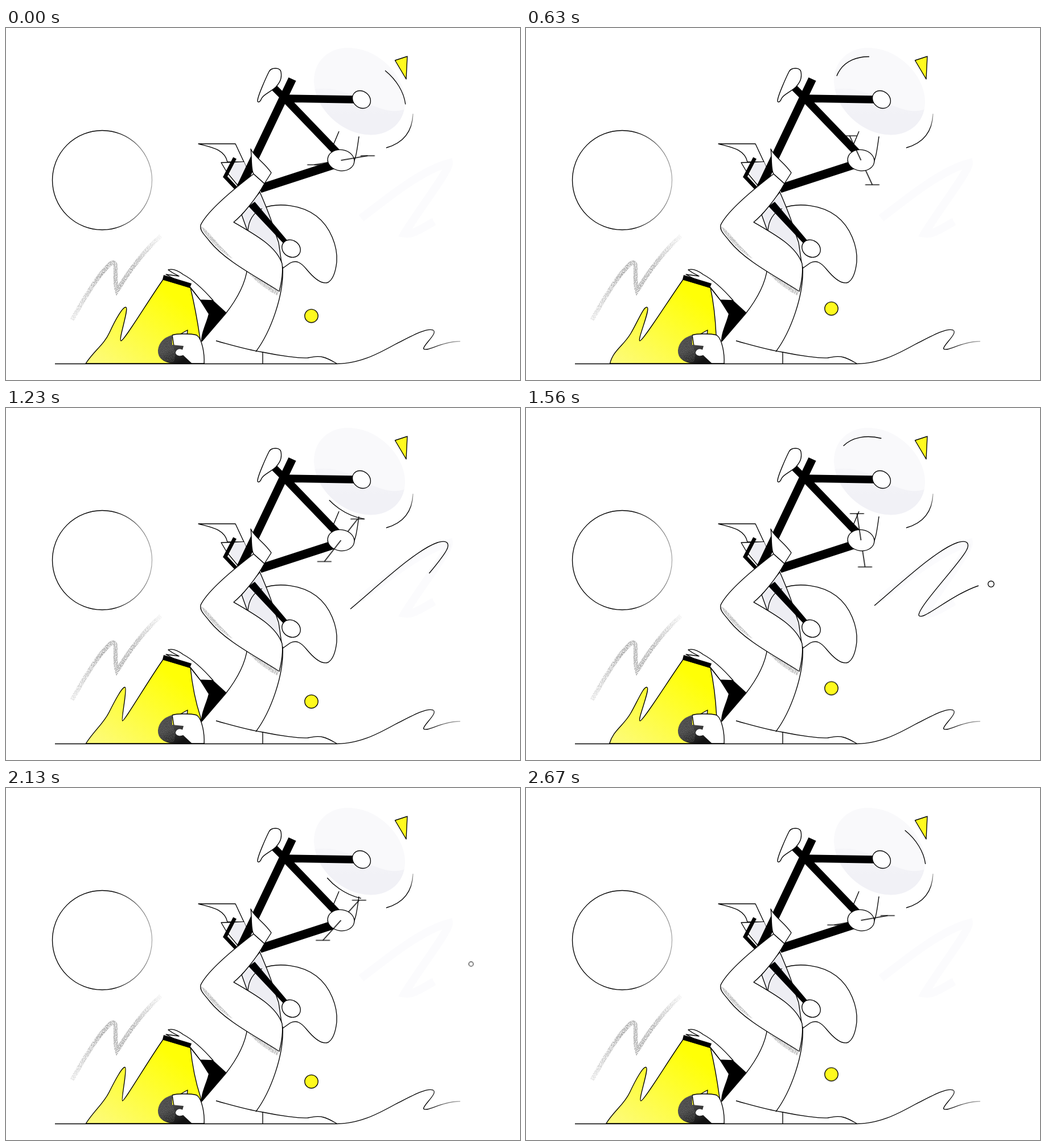
An HTML page without scripts for the animation above (2700 ms loop, 903 by 620 pixels).

```html
<!DOCTYPE html>
<html lang="en">
<head>
<meta charset="utf-8">
<title>Upside-down ride</title>
<style>
html, body { margin: 0; width: 100%; height: 100%; overflow: hidden; background: #fff; }
svg { display: block; width: 903px; height: 620px; }
.ink { fill: none; stroke: #000; stroke-width: 1.35; stroke-linejoin: round; }
.white { fill: #fff; }
.grey { fill: #eeeef3; }
.yellow { fill: #fefa1e; }
.tube { fill: none; stroke: #000; }

.ball { animation: bob 450ms cubic-bezier(.364, 0, .636, 1) -225ms infinite alternate; }
.spin { animation: spin 2700ms linear infinite; }
.level { animation: level 2700ms linear infinite; }
.whirl { stroke-dasharray: 71 408; animation: whirl 2700ms linear infinite; }
.flame { animation: blink 2700ms step-end infinite; }
.swoosh { stroke-dasharray: 100 200; animation: swoosh 2700ms ease-in-out infinite; }
.dot { animation: pop 2700ms ease-in-out infinite; }

@keyframes bob { from { transform: translateY(-13.5px); } to { transform: translateY(13.5px); } }
/* three turns, then the last step rests */
@keyframes spin { from { transform: rotate(-10deg); } 98.89%, to { transform: rotate(1070deg); } }
@keyframes level { from { transform: rotate(10deg); } 98.89%, to { transform: rotate(-1070deg); } }
@keyframes whirl { from { stroke-dashoffset: 112.5; } 98.89%, to { stroke-dashoffset: -1324.5; } }
@keyframes blink { 0% { opacity: 1; } 27.78% { opacity: 0; } 33.33%, 100% { opacity: 1; } }
@keyframes swoosh {
  0%, 33.9% { stroke-dashoffset: 100; }
  55.6% { stroke-dashoffset: 0; }
  77.8%, 100% { stroke-dashoffset: -100; }
}
@keyframes pop {
  0%, 53% { transform: scale(0); }
  57%, 77% { transform: scale(1); }
  82.5%, 100% { transform: scale(0); }
}
</style>
</head>
<body>
<svg viewBox="0 0 903 620">
  <defs>
    <filter id="grain" x="-10%" y="-10%" width="120%" height="120%">
      <feTurbulence type="fractalNoise" baseFrequency=".8" numOctaves="2" seed="4"/>
      <feColorMatrix values="0 0 0 0 0  0 0 0 0 0  0 0 0 0 0  0 0 0 5 -1.8"/>
      <feComposite in="SourceGraphic" operator="in"/>
    </filter>
    <linearGradient id="sun"><stop offset=".6"/><stop offset="1" stop-color="#aaa"/></linearGradient>
    <linearGradient id="road" gradientUnits="userSpaceOnUse" x1="740" x2="800">
      <stop offset="0"/><stop offset="1" stop-color="#bbb"/>
    </linearGradient>
    <linearGradient id="rim" x2="0" y2="1"><stop offset="0" stop-color="#bbb"/><stop offset=".5"/></linearGradient>
    <linearGradient id="chalk" gradientUnits="userSpaceOnUse" x1="116" y1="514" x2="272" y2="366">
      <stop offset="0" stop-color="#e6e6e6"/><stop offset=".45" stop-color="#aaa"/>
      <stop offset=".7" stop-color="#b4b4b4"/><stop offset="1" stop-color="#f4f4f4"/>
    </linearGradient>
    <linearGradient id="fire" gradientUnits="userSpaceOnUse" x1="290" y1="470" x2="185" y2="610">
      <stop offset="0" stop-color="#ffff06"/><stop offset="1" stop-color="#fdfb78"/>
    </linearGradient>
    <linearGradient id="hair" x2=".6" y2="1"><stop offset=".5" stop-color="#444"/><stop offset="1" stop-color="#111"/></linearGradient>
    <linearGradient id="shade" x2="0" y2="1"><stop offset="0" stop-color="#f6f6f9"/><stop offset=".5" stop-color="#f1f1f6"/></linearGradient>
    <clipPath id="wheel"><ellipse rx="87.5" ry="68" transform="translate(621 111.5) rotate(40)"/></clipPath>
  </defs>

  <!-- scenery -->
  <circle class="ink" cx="169" cy="268" r="87.5" style="stroke:url(#sun)"/>
  <path d="M116 514C135 480 165 430 185 414C199 407 188 440 195 463C215 430 240 395 272 366" fill="none" stroke="url(#chalk)" stroke-width="7.5" filter="url(#grain)"/>
  <path d="M624 335C670 300 730 250 778 238C780 250 725 320 700 362C715 365 735 350 752 341" fill="none" stroke="#fbfbfd" stroke-width="14"/>
  <path class="ink swoosh" pathLength="100" d="M605 354C655 312 720 250 758 237C777 231 780 240 773 252C760 276 690 349 690 365C695 377 745 330 795 313"/>
  <g transform="translate(817 310)"><circle class="ink white dot" r="5.3"/></g>
  <path class="ink yellow" d="M683.5 57L705 50L703 90Z"/>
  <circle class="ink yellow ball" cx="536.5" cy="507" r="11.7"/>

  <!-- rear wheel -->
  <g clip-path="url(#wheel)">
    <path fill="#f9f9fb" d="M530 25H715V200H530Z"/>
    <path fill="url(#shade)" d="M540 108C590 100 615 126 645 137S685 150 715 138V200H540Z"/>
  </g>
  <ellipse class="ink whirl" pathLength="479" rx="86.5" ry="65.2" transform="translate(622.3 123.5) rotate(35.3)"/>
  <path class="ink" style="stroke:url(#rim)" d="M715 151C714 180 700 202 668 211"/>
  <path class="ink" d="M585 182L575 206M620 191C617 212 615 235 605 247"/>

  <!-- far leg and front wheel -->
  <path class="ink" d="M425 357C426 340 434 325 450 318C478 306 520 312 545 331C570 350 583 385 581 412C579 430 574 443 566 448C553 453 537 436 528 425C518 413 510 408 499 414L485 424"/>
  <path class="ink grey" d="M446 289C455 310 467 340 470 352L479 378L485 420C465 390 440 368 424 357L414 329L430 308Z"/>
  <path class="ink" d="M425 357C426 340 434 325 450 318"/>
  <path class="ink white" d="M338 204H403L418 236H389C384 213 360 210 338 204Z"/>
  <path class="ink white" d="M378 237L418 236L423 247L407 277L388 254Z"/>
  <path class="grey" d="M399 237L418 236L423 247L407 275L394 257Z"/>

  <!-- frame -->
  <g transform="translate(588.5 233)"><g class="spin">
    <path class="ink" d="M0 0H-47.5"/>
    <g transform="translate(-47.5)"><path class="ink level" d="M-12.5 0H12.5"/></g>
  </g></g>
  <path class="tube" stroke-width="14.5" d="M503 90L412 281"/>
  <path class="tube" stroke-width="13.5" d="M490 124L583 221M490 124L612 126"/>
  <path class="tube" stroke-width="12" d="M471 105L492 126"/>
  <path class="tube" stroke-width="15.5" d="M575 241L446 283"/>
  <path class="tube" stroke-width="6.5" d="M402 229L385 262L404 282"/>
  <path d="M426 314L437 306L494 374L487 379Z"/>
  <path class="ink white" d="M442 129C441 122 458 85 462 77C466 69 481 69 483 77C485 88 482 95 474 104C466 112 452 117 449 124C447 130 443 132 442 129Z"/>
  <ellipse class="ink white" rx="17" ry="14.3" transform="translate(624.5 126) rotate(40)"/>
  <ellipse class="ink white" rx="23.5" ry="18.5" transform="translate(588.5 233) rotate(8)"/>
  <ellipse class="ink white" rx="17" ry="14.5" transform="translate(501 388.5) rotate(35)"/>
  <g transform="translate(588.5 233)"><g class="spin">
    <path class="ink" d="M0 0H47.5"/>
    <g transform="translate(47.5)"><path class="ink level" d="M-12.5 0H12.5"/></g>
  </g></g>

  <!-- flame -->
  <g class="flame">
    <path class="ink" style="fill:url(#fire)" d="M140 591C155 568 172 558 182 536S206 489 211 492 197 550 202 551 250 480 276 443L324 457Q334 500 340 541L348 591Z">
      <animate attributeName="d" dur="900ms" repeatCount="indefinite" keyTimes="0;.19;.4;.7;1" values="
        M140 591C155 568 172 558 182 536S206 489 211 492 197 550 202 551 250 480 276 443L324 457Q334 500 340 541L348 591Z;
        M136.5 591C154 568 170 558 181 536S206 489 211 492 199 550 203 551 250 480 276 443L324 457Q333 503 341 543L348 591Z;
        M141 591C155 568 171 556 181 536S205 489 209 492 202 550 205 551 250 480 276 443L324 457Q328 505 342 545L348 591Z;
        M147.5 591C153 568 171 560 184 538S207 489 213 492 195 550 200 551 250 480 276 443L324 457Q332 495 334 541L348 591Z;
        M140 591C155 568 172 558 182 536S206 489 211 492 197 550 202 551 250 480 276 443L324 457Q334 500 340 541L348 591Z"/>
    </path>
  </g>

  <!-- rider -->
  <path class="white" d="M424 423L486 422C489 470 465 535 439 570L345 552L386 503C400 485 420 455 424 423Z"/>
  <path class="ink" d="M424 423C420 455 400 485 386 503L344 552M486 420C489 470 465 535 439 570"/>
  <path class="ink white" d="M435 257C405 280 355 320 342 347C340 358 350 365 358 376C385 410 440 438 480 464C484 448 487 430 485 415C475 385 440 365 400 342C415 330 440 300 454 274Z"/>
  <g fill="#bbb" filter="url(#grain)">
    <path d="M342 350C350 350 364 372 398 406C378 396 352 370 342 350Z"/>
    <path d="M425 431L480 464L476 471C460 462 440 448 425 431Z"/>
  </g>
  <path class="ink white" d="M430 213C437 228 455 238 466 255L454 274L435 257C430 250 432 225 430 213Z"/>

  <path class="ink white" d="M285 426C294 423 303 428 311 434C330 444 350 464 364 480L341 479L324 457L281 434L304 437Q293 432 285 426Z"/>
  <path class="ink white" d="M324 457L341 479L356 503"/>
  <path d="M341 479L364 480L387 501L343 553C342 538 352 520 356 503Z"/>
  <path d="M277 435L326 450L323 458L275 443Z"/>

  <path class="ink white" d="M305 540L319 532L318 541"/>
  <path class="ink white" d="M292 541C300 538 325 538 335 541C345 548 349 575 348 591H300Z"/>
  <path fill="url(#hair)" d="M292 541C275 545 267 558 267 570C268 584 280 591 300 591H327L311 576C305 579 299 577 298 572C299 566 305 564 310 567L312 560L292 558Z"/>
  <path fill="#888" filter="url(#grain)" opacity=".3" d="M292 541C275 545 267 558 267 570C268 584 280 589 295 588L298 572L292 558Z"/>

  <path class="ink" d="M369 551C395 558 420 566 451 571C480 577 515 582 530 581C545 578 551 578 558 580C568 583 574 587 581 591M451 571V591"/>
  <path class="ink" style="stroke:url(#road)" d="M86 591.5H581C620 591 650 576 684 557C712 543 738 528 750 532C760 537 733 558 733.5 565C740 571 765 552 798 552"/>
</svg>
</body>
</html>
```
